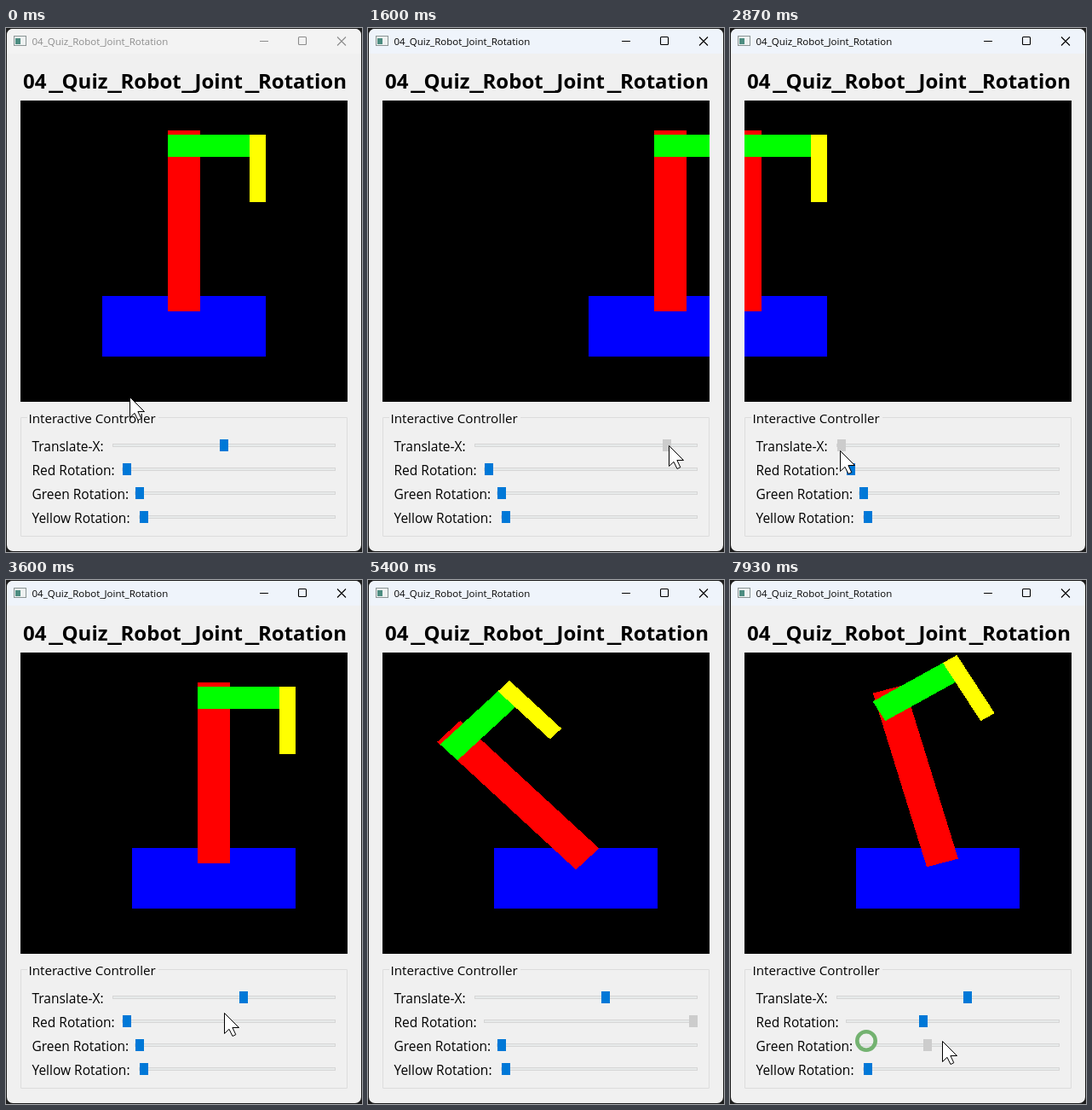
These frames come from a looping animation (418x614 px, 8 s). An HTML page:

```html
<!DOCTYPE html>
<html lang="en">
<head>
<meta charset="utf-8">
<title>Robot joint rotation</title>
<style>
  html, body { margin: 0; height: 100%; overflow: hidden; background: #1c1c1c; }
  svg { display: block; }
  text { font: 15.5px "Open Sans", "Noto Sans", sans-serif; fill: #000; }
  .head { font-size: 24px; font-weight: 700; }
  .rule { font-size: 37px; }
  .group { font-size: 15.2px; }
  #bar text { font-size: 11.5px; fill: currentColor; }
  #bar path, #bar .max { fill: none; stroke: currentColor; stroke-width: 1.1; }
  .crisp { shape-rendering: crispEdges; }
</style>
</head>
<body>
<svg width="418" height="614" viewBox="0 0 418 614">
  <rect x="1" y="1" width="416" height="612" rx="7" fill="#f0f0f0"/>
  <g id="bar">
    <path id="barFill" d="M1 30V8a7 7 0 0 1 7-7H410a7 7 0 0 1 7 7V30Z" style="stroke:none"/>
    <rect x="9.5" y="9.5" width="14" height="11" fill="#eef1f1" stroke="#8a9494"/>
    <rect x="11" y="12" width="6" height="7" fill="#4c8c80"/>
    <text x="30.5" y="20">04_Quiz_Robot_Joint_Rotation</text>
    <path d="M298 15.5h10M389 10.5l10 10M399 10.5l-10 10"/>
    <rect class="max" x="343.5" y="10.5" width="9" height="9" rx="1"/>
  </g>

  <svg x="17" y="85" width="384" height="353" viewBox="-1 -1 2 2" preserveAspectRatio="none">
    <rect x="-1" y="-1" width="2" height="2"/>
    <g transform="scale(1 -1)">
      <g id="base">
        <rect class="crisp" x="-.5" y="-.7" width="1" height=".4" fill="#00f"/>
        <g id="redArm">
          <rect class="crisp" x="-.1" y="-.4" width=".2" height="1.2" fill="#f00"/>
          <g id="greenArm">
            <rect class="crisp" x="-.1" y=".625" width=".6" height=".15" fill="#0f0"/>
            <rect class="crisp" x=".4" y=".325" width=".1" height=".45" fill="#ff0"/>
          </g>
        </g>
      </g>
    </g>
  </svg>

  <path d="M25 456.5H17.5V595.5H400.5V456.5H179" fill="none" stroke="#dcdcdc"/>
  <text class="group" x="26.5" y="463">Interactive Controller</text>
  <g id="panel"></g>
  <circle id="ring" r="10.7" fill="none" stroke="#73b270" stroke-width="4.6"/>
  <path id="cursor" d="M-.5.5V24.5L5 19.3l4 8.2 3.8-1.8-3.9-8.2h7.6z" fill="#fff" stroke="#000"/>
</svg>
<script>
const $ = id => document.getElementById(id);
const LOOP = 8000, STEPS = 120, LAG = .12, RING_STEPS = 7;

function add(tag, attrs, text) {
  const el = document.createElementNS("http://www.w3.org/2000/svg", tag);
  for (const name in attrs) el.setAttribute(name, attrs[name]);
  if (text) el.textContent = text;
  return $("panel").appendChild(el);
}

function place(id, transform) {
  $(id).setAttribute("transform", transform);
}

// Heading: words joined by wide underscores
[["04", 20], ["Quiz", 65.5], ["Robot", 134.5], ["Joint", 221.5], ["Rotation", 296]].forEach(([word, x], i) => {
  if (i) add("text", { class: "rule", x: x - 15.3, y: 69.5 }, "_");
  add("text", { class: "head", x, y: 71 }, word);
});

// Sliders: track start, resting knob, steps of press and release, knob offset from the pointer
const sliders = [
  { label: "Translate-X:", left: 126, rest: 256, press: 12, release: 53, grip: 0 },
  { label: "Red Rotation:", left: 137, rest: 142, press: 66, release: 103.5, grip: 0 },
  { label: "Green Rotation:", left: 152, rest: 157, press: 113, release: STEPS, grip: -18 },
  { label: "Yellow Rotation:", left: 157, rest: 162, press: STEPS, release: STEPS, grip: 0 }
];
sliders.forEach((s, i) => {
  const y = 489 + 28 * i;
  add("text", { x: 30.5, y: y + 7 }, s.label);
  add("rect", { x: s.left - .5, y: y - 1.5, width: 387 - s.left, height: 3, fill: "#e7eaea", stroke: "#d6d6d6" });
  s.knob = add("rect", { class: "crisp", y: y - 7, width: 10, height: 14 });
});

// Pointer strokes: first step, last step, destination x and y
const strokes = [
  [0, 12, 256, 488], [13, 19, 125, 489], [21, 26, 370, 489], [27, 31, 130, 491],
  [33, 38, 392, 492], [39, 43, 130, 495], [45, 49, 279, 496], [53, 54, 257, 507],
  [54, 66, 142, 520], [66, 72, 405, 522], [72, 77, 29, 515], [79, 81, 440, 515],
  [84, 89, 150, 517], [89, 93, 352, 521], [95, 99, 179, 521], [99, 103, 227, 521],
  [104, 112, 160, 540], [113, 119, 250, 540]
];

function pointer(step) {
  let x = 146, y = 432;
  for (const [from, to, toX, toY] of strokes) {
    if (step <= from) break;
    const ease = 1 - (1 - Math.min(1, (step - from) / (to - from))) ** 3;
    x += (toX - x) * ease;
    y += (toY - y) * ease;
  }
  return { x, y };
}

function knobX(s, step) {
  if (step <= s.press) return s.rest;
  const x = pointer(Math.min(step, s.release) - LAG).x + s.grip;
  return Math.max(s.left + 5, Math.min(382, x));
}

function draw(step) {
  const [shift, red, green] = sliders.map(s => {
    const x = knobX(s, step);
    s.knob.setAttribute("x", Math.round(x) - 5);
    s.knob.setAttribute("fill", step >= s.press && step <= s.release ? "#ccc" : "#0078d7");
    return (x - s.left - 5) / (377 - s.left);
  });
  place("base", `translate(${2 * shift - .996})`);
  place("redArm", `rotate(${45 * red} 0 -.3)`);
  place("greenArm", `rotate(${45 * green} 0 .7)`);

  const active = step >= sliders[0].press;
  $("bar").style.color = active ? "#000" : "#8c8c8c";
  $("barFill").style.fill = active ? "#eff4fb" : "#f3f3f3";

  const { x, y } = pointer(step);
  place("cursor", `translate(${Math.round(x)} ${Math.round(y)})`);

  const pressed = sliders.find(s => step >= s.press && step < s.press + RING_STEPS);
  $("ring").style.display = pressed ? "" : "none";
  if (pressed) {
    const spot = pointer(pressed.press);
    place("ring", `translate(${spot.x} ${spot.y})`);
  }
}

// Time advances in fixed steps, 15 per second
function tick() {
  const t = performance.now() % LOOP;
  draw(Math.min(STEPS - 1, Math.floor(t * STEPS / LOOP + .1)));
  requestAnimationFrame(tick);
}
tick();
</script>
</body>
</html>
```
